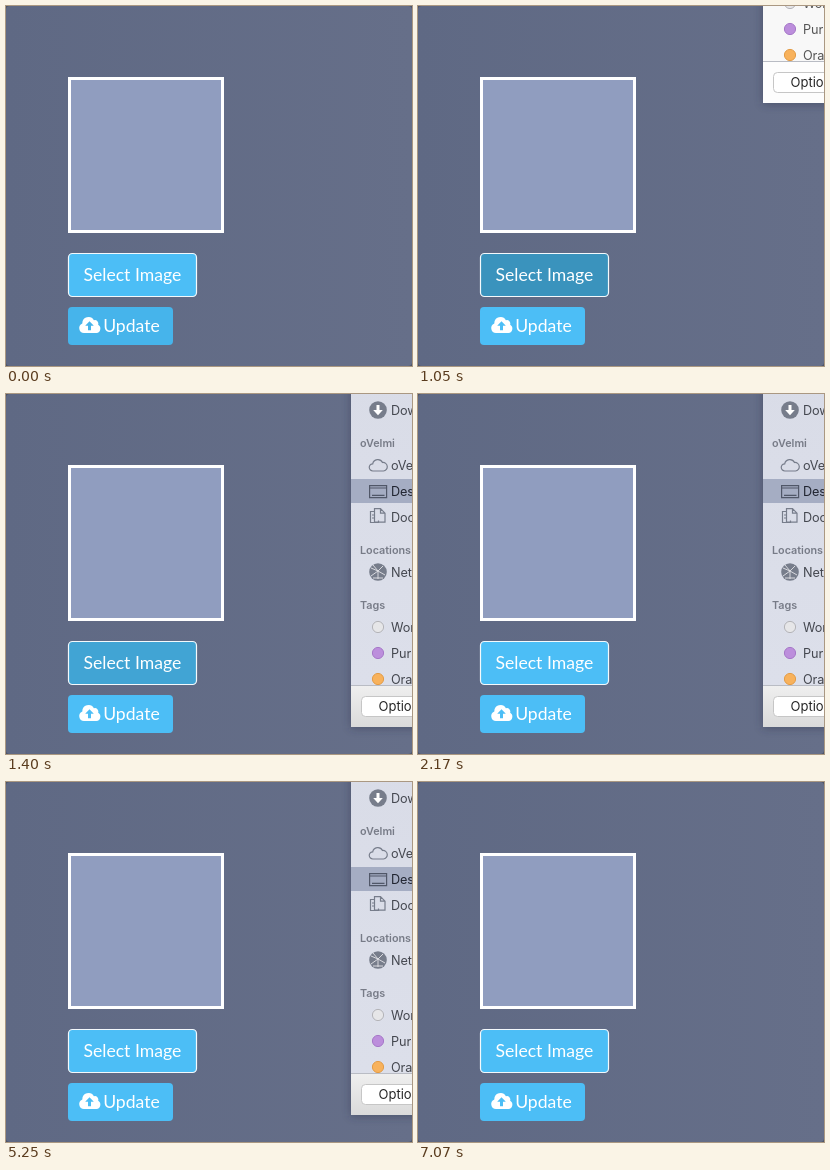
Write an HTML page that moves like this. It is 406 by 360 pixels and loops after 8 s.

```html
<!DOCTYPE html>
<html lang="en">
<head>
<meta charset="utf-8">
<title>Image picker sheet</title>
<style>
  html, body { margin: 0; width: 100%; height: 100%; overflow: hidden; background: #4c5468; }
  svg { display: block; width: 406px; height: 360px; }
  .label { font: 17.6px Lato, sans-serif; fill: #fff; }
  .head { font: 600 10.8px Inter, sans-serif; fill: #858585; }
  .item { font: 12.7px Inter, sans-serif; fill: #555; letter-spacing: -.1px; }
  .option { font: 13px Inter, sans-serif; fill: #262626; }
  .icon { fill: none; stroke: #8b8b8b; stroke-width: 1.2; }
  .solid { fill: #8b8b8b; stroke: none; }
  #side { fill: #f8f8f8; }
  #foot { fill: #fdfdfd; }
  #row { fill: #d8d8d8; }
  .active #side { fill: url(#tint); }
  .active #foot { fill: url(#steel); }
  .active #row { fill: #a5adc3; }
  .active .item { fill: #44474f; }
  .active .picked { fill: #202430; }
  .active .icon { stroke: #777d8b; }
  .active .solid { fill: #777d8b; stroke: none; }
  .active .dark { stroke: #505768; }
  .active .head { fill: #777b87; }
  .empty #list { display: none; }
  .empty #side { fill: #cbd1e0; }
</style>
</head>
<body>
<svg viewBox="0 0 406 360">
  <defs>
    <linearGradient id="back"><stop stop-color="#5f6984"/><stop offset="1" stop-color="#666f89"/></linearGradient>
    <linearGradient id="tint" x2="0" y2="1"><stop stop-color="#d9dce7"/><stop offset="1" stop-color="#dcdfea"/></linearGradient>
    <linearGradient id="steel" x2="0" y2="1"><stop stop-color="#efefef"/><stop offset="1" stop-color="#dadada"/></linearGradient>
    <filter id="shade" x="-30%" y="-10%" width="160%" height="120%"><feGaussianBlur stdDeviation="5"/></filter>
  </defs>
  <rect width="406" height="360" rx="4" fill="url(#back)"/>
  <rect x="63.5" y="72.5" width="153" height="153" fill="#909dbf" stroke="#fff" stroke-width="3"/>

  <rect id="select" x="62.5" y="247.5" width="128" height="43" rx="4" stroke="#f4f9fc" stroke-width="1.2"/>
  <text class="label" x="77.5" y="275">Select Image</text>
  <rect id="update" x="62" y="301" width="105" height="38" rx="4"/>
  <path fill="#fff" d="M78 327a5 5 0 0 1-1.7-9.6a6.2 6.2 0 0 1 11.6-3.2a3.5 3.5 0 0 1 4.3 4.5a4.5 4.5 0 0 1-1.700 8.300z"/>
  <path id="arrow" d="M83.500 315.200l4.300 4.600h-2.800v4.400h-3v-4.400h-2.800z"/>
  <text class="label" x="97.200" y="326">Update</text>

  <g id="sheet">
    <rect x="345" y="-30" width="90" height="364" fill="#20283c" opacity=".4" filter="url(#shade)"/>
    <rect id="side" x="345" y="-30" width="90" height="322"/>
    <g id="list">
      <rect id="row" x="345" y="85" width="70" height="24"/>
      <circle class="icon solid" cx="372" cy="16" r="8.800"/>
      <path fill="#fff" d="M370.500 11h3v5h3.300l-4.800 5.300l-4.800-5.300h3.300z"/>
      <path class="icon" d="M367 77a3.600 3.600 0 0 1-.3-7.200a5.200 5.200 0 0 1 9.800-1.300a3.800 3.800 0 0 1 1 8.500z"/>
      <path class="icon dark" d="M363.600 91.600h17v12h-17zM363.600 94h17M366 101.300h12.500" />
      <path class="icon" d="M368 117.500h-3.500v11h8v-2M368.500 114.700h6l4.500 4.500v9h-10.500zM374.500 114.700v4.500h4.500M366 121h2M366 124h2"/>
      <circle class="icon solid" cx="372" cy="178" r="8.800"/>
      <path fill="none" stroke="#e4e4e8" stroke-width=".9" d="M365 174l7 3l5-5M365 182l7-5l7 4M372 177v8M367 171l5 6M367 184l10 0"/>
    </g>
    <rect id="foot" x="345" y="291" width="90" height="42"/>
    <path d="M345 291.500h61" stroke="#b9bcc4"/>
    <rect x="355.500" y="302.500" width="80" height="20" rx="4" fill="#fff" stroke="#c6c6c6"/>
    <text class="option" x="372.500" y="317">Options</text>
  </g>
</svg>
<script>
const LOOP = 8000, STEP = 70;
const $ = id => document.getElementById(id);
const LIGHT = [76, 190, 246], HOVER = [58, 147, 189], DIM = [70, 180, 235];

function add(tag, attrs, text = '') {
  const el = document.createElementNS('http://www.w3.org/2000/svg', tag);
  for (const key in attrs) el.setAttribute(key, attrs[key]);
  el.textContent = text;
  $('list').append(el);
}

[['oVelmi', 53], ['Locations', 160], ['Tags', 215]]
  .forEach(([name, y]) => add('text', { class: 'head', x: 354, y }, name));
[['Downloads', 21], ['oVelmi Drive', 76], ['Desktop', 102], ['Documents', 128],
 ['Network', 183], ['Work', 238], ['Purple', 264], ['Orange', 290]]
  .forEach(([name, y]) => add('text', { class: name === 'Desktop' ? 'item picked' : 'item', x: 385, y }, name));
[['#e6e6e8', '#b4b4b8', 233], ['#bc8edc', '#a678c8', 259], ['#f8b25c', '#e39c46', 285]]
  .forEach(([fill, stroke, cy]) => add('circle', { cx: 372, cy, r: 5.6, fill, stroke }));

// Linear interpolation through [time, value] pairs
function track(keys, t) {
  const i = keys.findIndex(k => k[0] > t);
  if (i === 0) return keys[0][1];
  if (i < 0) return keys[keys.length - 1][1];
  const [t0, a] = keys[i - 1], [t1, b] = keys[i];
  return a + (b - a) * (t - t0) / (t1 - t0);
}

const mix = (a, b, k) => `rgb(${a.map((v, i) => Math.round(v + (b[i] - v) * k))})`;

const hover = [[140, 0], [420, 1], [1260, 1], [1610, 0]];
const wake = [[0, 0], [280, 1]];
const slide = [[980, -360], [1050, -236], [1120, -120], [1190, -35], [1260, 0],
               [6790, 0], [6860, -45], [6930, -160], [7000, -290], [7070, -360]];

function draw(time) {
  const t = Math.floor(time % LOOP / STEP) * STEP;
  const blue = mix(DIM, LIGHT, track(wake, t));
  $('select').setAttribute('fill', mix(LIGHT, HOVER, track(hover, t)));
  $('update').setAttribute('fill', blue);
  $('arrow').setAttribute('fill', blue);
  const sheet = $('sheet');
  sheet.setAttribute('transform', `translate(0 ${track(slide, t)})`);
  sheet.setAttribute('visibility', t >= 1050 && t < 7070 ? 'visible' : 'hidden');
  sheet.classList.toggle('active', t >= 1330);
  sheet.classList.toggle('empty', t >= 6720);
}

const start = performance.now();
function tick() {
  draw(performance.now() - start);
  requestAnimationFrame(tick);
}
tick();
</script>
</body>
</html>
```
